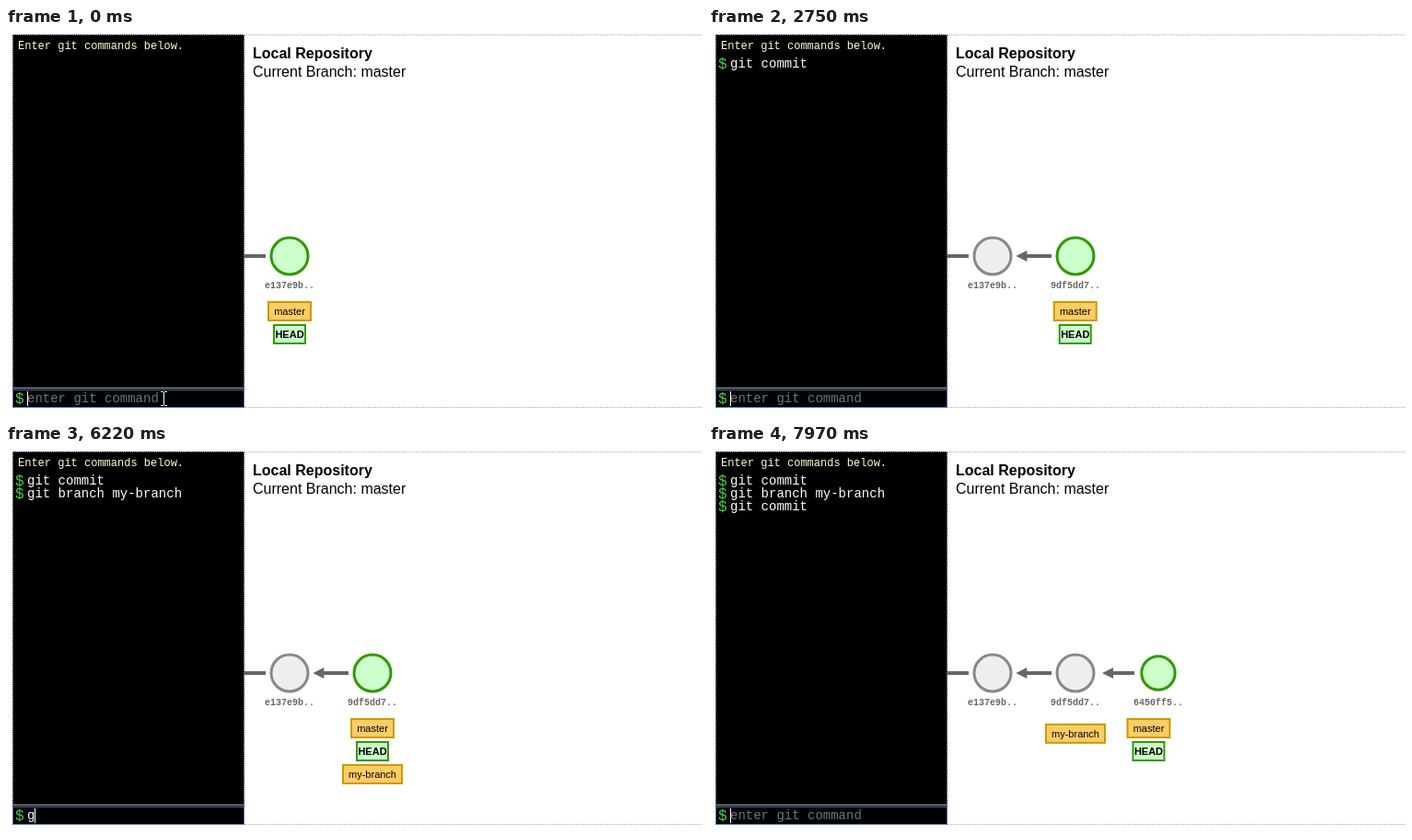
Write an HTML page with a canvas that moves like this. It is 757 px wide and 423 px high and loops after 8000 ms.

```html
<!DOCTYPE html>
<html lang="en">
<head>
<meta charset="utf-8">
<title>Git branch demo</title>
<style>
  html, body { margin: 0; width: 100%; height: 100%; overflow: hidden; background: #fff; }
  canvas { display: block; }
</style>
</head>
<body>
<canvas id="stage" width="757" height="423"></canvas>
<script>
const ctx = document.getElementById('stage').getContext('2d');
const LOOP = 8000, TICK = 125, EASE_MS = 500;
const MONO = '"Liberation Mono", "Courier New", monospace';
const SANS = '"Liberation Sans", Arial, sans-serif';
const GREEN = ['#ccffcc', '#339900'], GREY = ['#eeeeee', '#888888'], AMBER = ['#ffcc66', '#cc9900'];
const ROW = 248, R = 20, GAP = 90, FIRST_X = 308;
const CIRCLE_LEAD = 10; // circles start to grow just before the tags move

const COMMIT = 'git commit', BRANCH = 'git branch my-branch';

// [time, command, characters typed]
const keys = [
  [130, '', 0],
  [1130, COMMIT, 1], [1250, COMMIT, 3], [1380, COMMIT, 4],
  [1630, COMMIT, 5], [1750, COMMIT, 7], [2000, COMMIT, 8], [2130, COMMIT, 10],
  [2380, '', 0],
  [3000, BRANCH, 1], [3130, BRANCH, 3], [3250, BRANCH, 4],
  [3500, BRANCH, 5], [3620, BRANCH, 4], [3740, BRANCH, 5],
  [3990, BRANCH, 7], [4110, BRANCH, 10], [4230, BRANCH, 12],
  [4350, BRANCH, 15], [4480, BRANCH, 17], [4600, BRANCH, 20], [4720, BRANCH, 20],
  [5220, '', 0],
  [6220, COMMIT, 1], [6340, COMMIT, 3], [6470, COMMIT, 4],
  [7090, COMMIT, 5], [7220, COMMIT, 7], [7350, COMMIT, 8], [7470, COMMIT, 10],
  [7720, '', 0]
];
const log = [[2380, COMMIT], [5220, BRANCH], [7720, COMMIT]];

// lag: how far the easing has run when the commit first shows
const commits = [
  { id: 'e137e9b..', at: -1000, lag: 0 },
  { id: '9df5dd7..', at: 2380, lag: 80 },
  { id: '6450ff5..', at: 7720, lag: 96 }
];

function text(str, x, y, font, color, align = 'left') {
  ctx.font = font;
  ctx.fillStyle = color;
  ctx.textAlign = align;
  ctx.fillText(str, x, y);
}

function box(x, y, w, h, color) {
  ctx.fillStyle = color;
  ctx.fillRect(x, y, w, h);
}

function poly(points, fill, stroke) {
  ctx.beginPath();
  points.forEach(([x, y]) => ctx.lineTo(x, y));
  ctx.closePath();
  ctx.fillStyle = fill;
  ctx.fill();
  if (stroke) {
    ctx.strokeStyle = stroke;
    ctx.lineWidth = 1;
    ctx.stroke();
  }
}

function dotted(x1, y1, x2, y2) {
  ctx.save();
  ctx.setLineDash([1, 1]);
  ctx.strokeStyle = '#aaa';
  ctx.lineWidth = 1;
  ctx.beginPath();
  ctx.moveTo(x1, y1);
  ctx.lineTo(x2, y2);
  ctx.stroke();
  ctx.restore();
}

function easeCubic(p) {
  p = Math.min(1, Math.max(0, p));
  return p < 0.5 ? 4 * p ** 3 : 1 - 4 * (1 - p) ** 3;
}

// The graph advances in steps of one tick
function progress({ at, lag }, t, lead = 0) {
  if (t < at) return 0;
  const held = Math.floor((t - at + 5) / TICK) * TICK;
  return easeCubic((held + lag + lead) / EASE_MS);
}

function drawPrompt(y) {
  text('$', 10, y + 1, '16px ' + MONO, '#44d644');
}

function drawInput(t) {
  const [time, command, count] = keys.filter(k => k[0] <= t).pop() || keys[0];
  const font = '14px ' + MONO;
  drawPrompt(407);
  if (count) text(command.slice(0, count), 23, 407, font, '#fff');
  else text('enter git command', 23, 407, font, '#757575');
  if ((t - time) % 1000 < 500) box(Math.round(23 + count * 8.4), 395, 1, 16, '#fff');
}

function drawTerminal(t) {
  text('Enter git commands below.', 13, 23, '12px ' + MONO, '#ffffcc');
  log.filter(([at]) => t >= at).forEach(([, command], i) => {
    const y = 43 + i * 14;
    drawPrompt(y);
    text(command, 23, y, '14px ' + MONO, '#fff');
  });
  box(8, 391, 250, 1, '#aaa');
  ctx.strokeStyle = '#4a70b4';
  ctx.lineWidth = 1;
  ctx.strokeRect(7.5, 393.5, 251, 19);
  drawInput(t);
}

function drawTag(name, x, y, [fill, stroke], weight = '') {
  const w = name.length * 6 + 10;
  box(x - w / 2, y, w, 20, fill);
  ctx.strokeStyle = stroke;
  ctx.lineWidth = 2;
  ctx.strokeRect(x - w / 2, y, w, 20);
  text(name, x, y + 14, weight + ' 11px ' + SANS, '#000', 'center');
}

function drawCommit({ id }, x, p, colors) {
  ctx.beginPath();
  ctx.arc(x, ROW, 1 + (R - 1) * p, 0, Math.PI * 2);
  ctx.fillStyle = colors[0];
  ctx.fill();
  ctx.strokeStyle = colors[1];
  ctx.lineWidth = 3;
  ctx.stroke();
  text(id, x, 283, 'bold 10px ' + MONO, '#666', 'center');
}

function drawPointer(x, p) {
  const start = x - R * 1.3;
  const end = start - 32 * p;
  const tip = end - 6.7;
  box(end, ROW - 2, start - end, 4, '#666');
  poly([[tip, ROW], [tip + 12, ROW - 6], [tip + 12, ROW + 6]], '#666');
}

function drawGraph(t) {
  const shown = commits.filter(c => t >= c.at);
  const last = shown.length - 1;
  box(259, ROW - 2, 23, 4, '#666');
  shown.forEach((c, i) => {
    const x = FIRST_X + i * GAP;
    if (i) drawPointer(x, progress(c, t));
    drawCommit(c, x, progress(c, t, CIRCLE_LEAD), i === last ? GREEN : GREY);
  });

  const headX = FIRST_X + GAP * (progress(commits[1], t) + progress(commits[2], t));
  drawTag('master', headX, 298, AMBER);
  drawTag('HEAD', headX, 323, GREEN, 'bold');
  if (t >= 5220) drawTag('my-branch', FIRST_X + GAP, 348 - 50 * progress(commits[2], t), AMBER);
}

function drawMouse(t) {
  if (t < 250) {
    box(168, 395, 3, 1, '#fff');
    box(172, 395, 3, 1, '#fff');
    box(171, 396, 1, 14, '#fff');
    box(168, 410, 3, 1, '#fff');
    box(172, 410, 3, 1, '#fff');
  } else if (t < 2380) {
    poly([[396.5, 51.5], [396.5, 67], [400, 63.8], [402.4, 69.3], [404.8, 68.3],
          [402.5, 62.8], [407.3, 62.8]], '#fff', '#000');
  }
}

function drawFrame() {
  box(0, 0, 757, 423, '#fff');
  box(7, 7, 252, 406, '#000');
  dotted(7, 7.5, 757, 7.5);
  dotted(7, 412.5, 757, 412.5);
  dotted(7.5, 7, 7.5, 413);
  dotted(258.5, 7, 258.5, 413);
}

function draw(t) {
  drawFrame();
  drawTerminal(t);
  text('Local Repository', 268, 33, 'bold 16px ' + SANS, '#000');
  text('Current Branch: master', 268, 53, '16px ' + SANS, '#000');
  drawGraph(t);
  drawMouse(t);
}

const began = performance.now();
function frame() {
  draw((performance.now() - began) % LOOP);
  requestAnimationFrame(frame);
}
frame();
</script>
</body>
</html>
```
